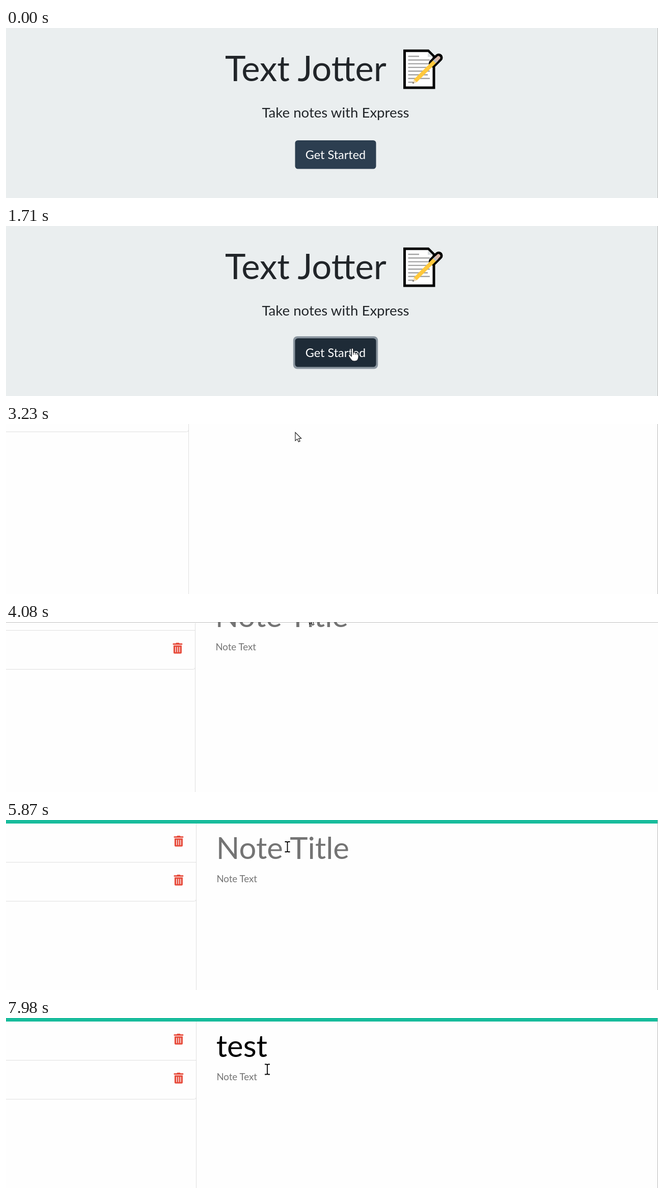
Recreate the animation shown at these times as an HTML page. Size 1280 by 336 pixels, loop 8 s.

```html
<!DOCTYPE html>
<html lang="en">
<head>
<meta charset="utf-8">
<title>Text Jotter</title>
<style>
html, body { margin: 0; width: 100%; height: 100%; overflow: hidden; background: #fefefe; }
svg { display: block; width: 1280px; height: 336px; font-family: Lato, sans-serif; }
.hint { fill: #747474; }
.rule { fill: none; stroke: #dfdfdf; }
</style>
</head>
<body>
<svg viewBox="0 0 1280 336" xmlns="http://www.w3.org/2000/svg">
  <defs>
    <path id="bin" transform="scale(.0419)" fill="#e74c3c" d="M32 464a48 48 0 0 0 48 48h288a48 48 0 0 0 48-48V128H32zm272-256a16 16 0 0 1 32 0v224a16 16 0 0 1-32 0zm-96 0a16 16 0 0 1 32 0v224a16 16 0 0 1-32 0zm-96 0a16 16 0 0 1 32 0v224a16 16 0 0 1-32 0zM432 32H312l-9.4-18.7A24 24 0 0 0 281.1 0H166.8a23.7 23.7 0 0 0-21.4 13.3L136 32H16A16 16 0 0 0 0 48v32a16 16 0 0 0 16 16h416a16 16 0 0 0 16-16V48a16 16 0 0 0-16-16z"/>
  </defs>
  <rect width="1280" height="336" fill="#fefefe"/>

  <g id="home">
    <rect width="1280" height="336" fill="#eaeeef"/>
    <g fill="#212529">
      <text x="430" y="105" font-size="68.75">Text Jotter</text>
      <text x="647" y="177" font-size="27.6" text-anchor="middle">Take notes with Express</text>
    </g>
    <g id="memo">
      <path d="M782.5 45H829L840 56V118H782.5Z" fill="#fff" stroke="#000" stroke-width="5"/>
      <path d="M828 47V57H838Z" fill="#d8dcde"/>
      <path id="lines" stroke="#a3a3a3" stroke-width="2.4"/>
      <path d="M838 70 849.5 58.5" stroke="#000" stroke-width="16" stroke-linecap="round"/>
      <path d="M798 110 800.5 102 806 107.5Z" fill="#f0d9b0"/>
      <path d="M798 110 799 106.5 801.5 109Z" fill="#555"/>
      <path d="M803.5 104.5 842 66" stroke="#ffc83d" stroke-width="8"/>
      <path d="M841 67 846 62" stroke="#b9bdbf" stroke-width="8"/>
      <path d="M846 62 849 59" stroke="#d9b8aa" stroke-width="7" stroke-linecap="round"/>
    </g>
    <rect id="ring" x="563.8" y="218" width="166.4" height="64.5" rx="8" fill="#2c3e50"/>
    <rect id="btn" x="567.5" y="222" width="159" height="56.5" rx="5.5"/>
    <text x="647" y="259" font-size="23.44" fill="#fff" text-anchor="middle">Get Started</text>
  </g>

  <g id="notes">
    <path id="edge" d="M0 .5H1280" stroke="#bebebe"/>
    <g id="page">
      <path class="rule" d="M0 83.5H373M0 160.5H369.5q4 0 4-4M373.5-400V800"/>
      <use href="#bin" transform="translate(329.5 31)"/>
      <use href="#bin" transform="translate(329.5 108)"/>
      <text id="title" x="412.8" y="77" font-size="59.8"></text>
      <text class="hint" x="413.4" y="123" font-size="18.65">Note Text</text>
      <rect x="-40" y="-70" width="1400" height="77" fill="#18bc9c"/>
      <rect id="caret" y="22" width="1.5" height="62"/>
    </g>
  </g>
  <path id="side" d="M1279.5 0V336" stroke="#b8b8b8"/>

  <g id="arrow" fill="#fff" stroke="#111" stroke-width="1.1">
    <path d="M.5.5V17L4.3 13.5 7 19.3 9.7 18 7.2 12.5H12.2Z"/>
  </g>
  <g id="hand" fill="#fff" stroke="#1a1f26" stroke-width="1.1" stroke-linejoin="round">
    <path d="M-1.8 14V2a1.8 1.8 0 0 1 3.6 0V8.5q3.2-1.5 4 .8 3-1 3.6 1.2 2.6-.4 2.6 2.2V18q-1.2 7.5-6.5 7.5H2.5q-3 0-5.2-3.2L-7.3 15.5q-1.2-3 1.3-3 2 .3 4.2 4Z"/>
    <path d="M1.8 8.5V13M5.8 9.5V13M9.4 10.7V13.5" fill="none"/>
  </g>
  <g id="beam" fill="none">
    <path d="M-5-10H-2Q0-10 0-8 0-10 2-10H5M0-8V8M-5 10H-2Q0 10 0 8 0 10 2 10H5" stroke="#fff" stroke-width="3.6"/>
    <path d="M-5-10H-2Q0-10 0-8 0-10 2-10H5M0-8V8M-5 10H-2Q0 10 0 8 0 10 2 10H5" stroke="#000" stroke-width="1.8"/>
  </g>
</svg>
<script>
const LOOP = 8000;
const $ = id => document.getElementById(id);
const set = (id, name, value) => $(id).setAttribute(name, value);
const show = (id, on) => set(id, 'visibility', on ? 'visible' : 'hidden');
const move = (id, x, y) => set(id, 'transform', `translate(${x} ${y})`);
const mix = (a, b, p) => a + (b - a) * p;
const ramp = (t, a, b) => Math.min(1, Math.max(0, (t - a) / (b - a)));

// Number of the n updates between a and b already made at time t.
const count = (t, a, b, n) =>
  t < a ? 0 : Math.min(n, Math.floor((t - a) / (b - a) * (n - 1) + 0.12) + 1);

// Scroll offset and sideways shift after each scroll update.
const scrollY = [-145, -136, -121, -103, -85, -67, -48, -30, -17, -8, -2, 0];
const shiftX = [-15, -12, -8, -5, -3, -2, -1, -1, 0, 0, 0, 0];

const keys = [6530, 6680, 6930, 7070];
const caretX = [413, 435, 466, 491, 512.5];

let lines = '';
for (let i = 0; i < 8; i++) {
  const end = [811, 832, 832, 832, 832, 828, 832, 804][i];
  lines += `M789.5 ${56 + i * 7.3}H${end}`;
}
set('lines', 'd', lines);

function pointer(t) {
  if (t < 680) return ['none', 0, 0];
  if (t < 1920) {
    const q = 1 - (count(t, 680, 1070, 6) - 1) / 5;
    const x = mix(680, 842, q ** 3), y = mix(241.5, 294, q ** 4);
    return [x < 727 ? 'hand' : 'arrow', x, y];
  }
  if (t < 2530) return ['hand', 680, 241.5];
  if (t < 3630) {
    const p = count(t, 2530, 3300, 11) / 11, q = 1 - p;
    return ['arrow', q * q * 680 + 2 * p * q * 484 + p * p * 583,
      q * q * 241 + 2 * p * q * 110 - p * p * 5];
  }
  if (t < 5030) return ['arrow', 595, -13];
  if (t < 7600) {
    const p = Math.min(1, count(t, 5030, 5490, 7) / 6);
    const y = mix(-13, 53, p);
    return [y > 15 ? 'beam' : 'arrow', mix(595, 552.5, p), y];
  }
  const p = count(t, 7680, 7980, 5) / 5;
  return ['beam', mix(552.5, 513, p), mix(53, 101.5, p)];
}

function draw(t) {
  const home = t < 1920;
  set('home', 'display', home ? 'inline' : 'none');
  set('notes', 'display', home ? 'none' : 'inline');

  const hover = ramp(t, 836, 986);
  const shade = [[44, 30], [62, 43], [80, 55]].map(c => Math.round(mix(c[0], c[1], hover)));
  set('btn', 'fill', `rgb(${shade})`);
  set('ring', 'opacity', 0.5 * ramp(t, 1440, 1600));

  const n = count(t, 3780, 4550, 11);
  move('page', shiftX[n], scrollY[n]);
  show('edge', n > 0);
  // The window border is away while the page slides sideways.
  show('side', n === 0 || shiftX[n] === 0);

  const typed = keys.filter(k => t >= k).length;
  $('title').textContent = typed ? 'test'.slice(0, typed) : 'Note Title';
  set('title', 'fill', typed ? '#000' : '#747474');
  set('caret', 'x', caretX[typed]);
  show('caret', (t >= 5490 && t < 5870) || (t >= 6430 && t < 7600));

  const [kind, x, y] = pointer(t);
  for (const id of ['arrow', 'hand', 'beam']) show(id, id === kind);
  if (kind !== 'none') move(kind, x, y);
}

const start = performance.now();
function tick() {
  draw((performance.now() - start) % LOOP);
  requestAnimationFrame(tick);
}
draw(0);
requestAnimationFrame(tick);
</script>
</body>
</html>
```
